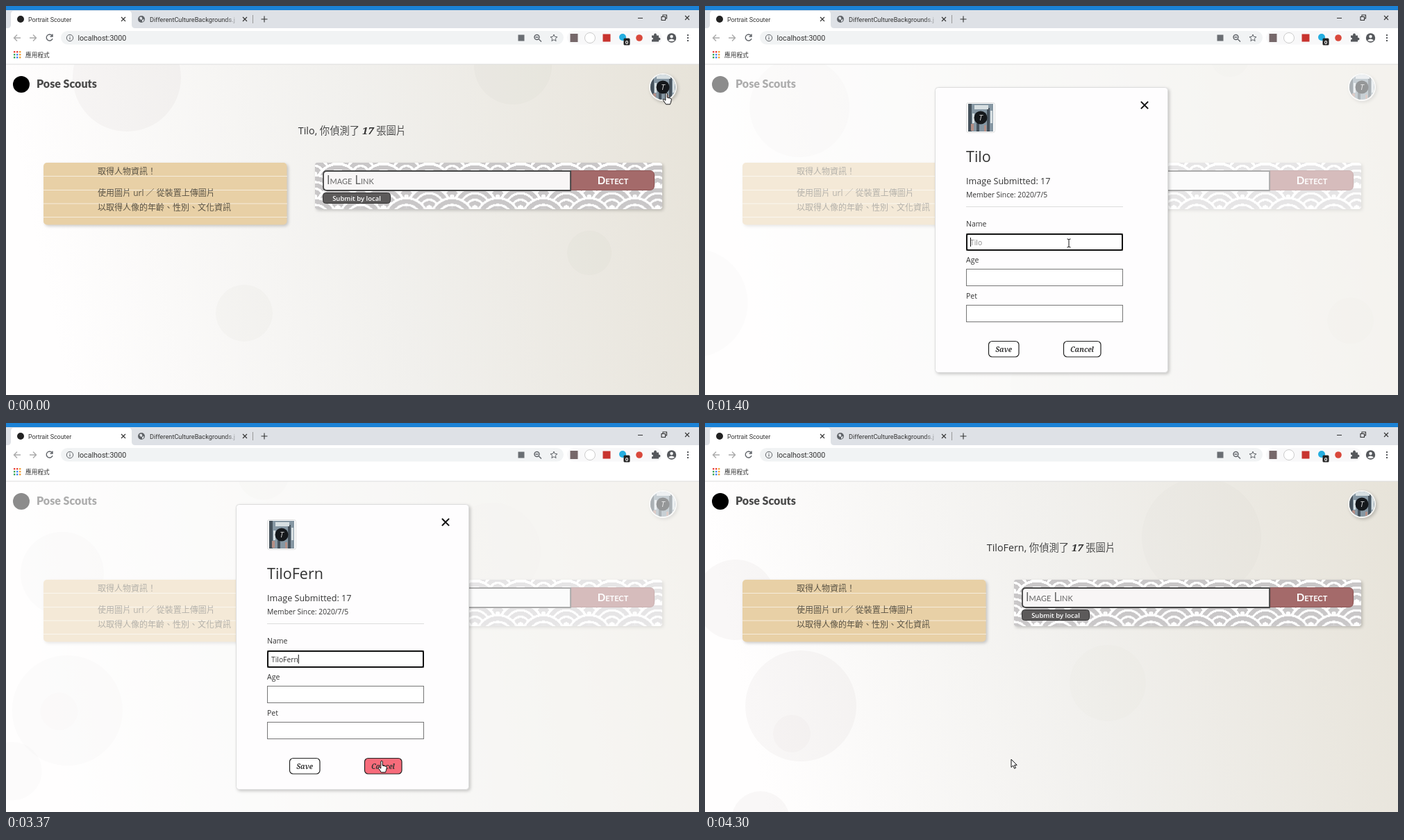
Recreate the animation shown at these times as an HTML page. Size 998 by 561 pixels, loop 4.33 s.

```html
<!DOCTYPE html>
<html lang="zh-Hant">
<head>
<meta charset="utf-8">
<title>Portrait Scouter</title>
<style>
html, body { margin: 0; width: 100%; height: 100%; overflow: hidden; background: #fff }
svg { display: block; width: 100%; height: 100% }
text { font-family: "Open Sans", "Noto Sans CJK TC", "Noto Sans CJK", sans-serif; fill: #333; white-space: pre }
.ui text { font-family: Roboto, "Noto Sans CJK TC", "Noto Sans CJK", sans-serif }
.light { font-weight: 300; font-size: 12px; fill: #5a5345 }
.caps { font-family: Lato, sans-serif; font-variant: small-caps; font-size: 15.2px }
.brush { font-family: "Noto Serif", serif; font-weight: 700; font-style: italic }
.thin { font-weight: 300; fill: #4c4c4c }
.mid { text-anchor: middle }
.line { fill: none; stroke: #5f6368; stroke-width: 1.4 }
.field { fill: #fff; stroke: #767676; stroke-width: 1 }
.button { fill: #fff; stroke: #222; stroke-width: 1.2 }
.shadow { filter: drop-shadow(2px 2px 2px #0003) }
.waves {
  --g: #c9c7c8;
  --side: var(--g) 24%, #fff 24% 28%, var(--g) 28% 36%, #fff 36% 40%, #0000 40%;
  --edge: #fff 5%, var(--g) 5% 15%, #fff 15% 20%, var(--g) 20% 29%, #fff 29% 34%, var(--g) 34% 44%, #fff 44% 49%, #0000 49%;
  height: 67px; border-radius: 4px;
  background: radial-gradient(circle at 100% 150%, var(--side)),
    radial-gradient(circle at 0 150%, var(--side)),
    radial-gradient(circle at 50% 100%, #fff 10%, var(--g) 10% 23%, #fff 23% 30%, var(--g) 30% 43%, #fff 43% 50%, var(--g) 50% 63%, #fff 63% 71%, #0000 71%),
    radial-gradient(circle at 100% 50%, var(--edge)),
    radial-gradient(circle at 0 50%, var(--edge)) var(--g);
  background-size: 65.8px 32.9px;
}
</style>
</head>
<body>
<svg viewBox="0 0 998 561">
  <defs>
    <linearGradient id="paper" y1=".1" x2="1" y2="0">
      <stop stop-color="#fffefe"/><stop offset=".5" stop-color="#f1f0ed"/><stop offset="1" stop-color="#e7e3d9"/>
    </linearGradient>
    <linearGradient id="fade"><stop stop-color="#dee1e6" stop-opacity="0"/><stop offset="1" stop-color="#dee1e6"/></linearGradient>
    <clipPath id="round"><circle r="18"/></clipPath>
    <g id="photo">
      <path fill="#8697a3" d="M-18-20h36v40h-36z"/>
      <path fill="#46525c" d="M-18-20h5v40h-5zM-6-8h4v28h-4zM9-14h4v34h-4z"/>
      <path fill="#d7dfe2" d="M-9-18h20v6h-20zM-12-6h3v14h-3zM14-10h3v18h-3z"/>
      <path fill="#b58f86" d="M-14 9h4v10h-4zM5 11h3v9h-3z"/>
      <circle r="9.5" fill="#15181b"/>
      <text class="mid" y="4" font-size="11" font-style="italic" style="fill:#ddd">T</text>
    </g>
    <path id="x" d="M-3-3 3 3M3-3-3 3"/>
  </defs>

  <rect y="84" width="998" height="477" fill="url(#paper)"/>
  <g id="bubbles" fill="#5a4c38"></g>

  <circle cx="22" cy="113" r="12"/>
  <text x="44" y="118" font-size="16" style="font-family:Lato,sans-serif;font-weight:900;fill:#4a4a4a">Pose Scouts</text>
  <g transform="translate(946 117)">
    <circle class="shadow" r="20" fill="#f4f4f2"/>
    <use href="#photo" clip-path="url(#round)"/>
  </g>
  <text class="mid" x="498.5" y="185" font-size="14.3"><tspan id="greeted"></tspan>, <tspan class="thin">你偵測了</tspan> <tspan class="brush" font-size="15">17</tspan> <tspan class="thin">張圖片</tspan></text>

  <rect class="shadow" x="54" y="226" width="350.500" height="89.500" rx="5" fill="#e8d0a6"/>
  <path stroke="#fff" stroke-opacity=".6" d="M54 245.500h351M54 265.500h351M54 285h351M54 304.500h351"/>
  <text class="light" x="132" y="243">取得人物資訊！</text>
  <text class="light" x="132" y="274">使用圖片 <tspan font-weight="400">url</tspan> ／ 從裝置上傳圖片</text>
  <text class="light" x="132" y="295">以取得人像的年齡、性別、文化資訊</text>

  <rect class="shadow" x="445" y="226" width="500" height="67" rx="4" fill="#ccc"/>
  <foreignObject x="445" y="226" width="500" height="67"><div class="waves"></div></foreignObject>
  <path fill="#a46a6a" stroke="#8d5555" d="M814 237.500h113q6.500 0 6.500 6.500v15q0 6.500-6.500 6.500H814z"/>
  <path fill="#f8f6f6" stroke="#444" stroke-width="1.800" d="M813 238H462q-5 0-5 5v18q0 5 5 5h351z"/>
  <text class="caps" x="462" y="257" style="fill:#666;font-size:16.300px">Image Link</text>
  <text class="caps mid" x="874" y="257" font-weight="700" style="fill:#fff">Detect</text>
  <rect x="456.500" y="269.500" width="97" height="15" rx="4" fill="#5c5a5a" stroke="#333"/>
  <text class="mid" x="505" y="281" font-size="9.500" font-weight="600" style="fill:#fff">Submit by local</text>

  <g id="menu">
    <rect class="shadow" x="863" y="142" width="105" height="58" fill="#f4f4f2"/>
    <rect id="pressed" x="863" y="147.500" width="104" height="24" rx="3" fill="#0a7af5" stroke="#111" stroke-width="1.600"/>
    <text id="viewItem" x="879" y="164" font-size="10">View Profile</text>
    <text x="879" y="187" font-size="10" style="fill:#666">Sign Out</text>
  </g>

  <g id="modal">
    <rect y="84" width="998" height="477" fill="#fff" fill-opacity=".55"/>
    <rect class="shadow" x="331.500" y="117.500" width="335" height="411" rx="4" fill="#fefdfe" stroke="#ddd"/>
    <rect x="376.500" y="139.500" width="41" height="43" rx="3" fill="#fff" stroke="#ddd"/>
    <use href="#photo" x="397" y="161"/>
    <use href="#x" transform="translate(633 143) scale(1.700)" stroke="#111" stroke-width="1.200"/>
    <text id="heading" x="376" y="225" font-size="21.500"></text>
    <text x="376" y="257" font-size="12.600">Image Submitted: 17</text>
    <text x="376" y="276" font-size="10.300">Member Since: 2020/7/5</text>
    <path stroke="#ddd" d="M376 289.500h226"/>
    <g font-size="10.500"><text x="376" y="318">Name</text><text x="376" y="370">Age</text><text x="376" y="422">Pet</text></g>
    <rect class="field" x="376.500" y="328.500" width="225" height="24"/>
    <rect class="field" x="376.500" y="379.500" width="225" height="24"/>
    <rect class="field" x="376.500" y="431.500" width="225" height="24"/>
    <rect id="focus" x="377" y="329" width="224" height="23" rx="2" fill="none" stroke="#111" stroke-width="2"/>
    <text id="typed" x="382" y="344.500" font-size="10.300"></text>
    <rect id="caret" y="334" width="1" height="13" fill="#111"/>
    <rect id="save" class="button" x="408.500" y="483.500" width="43.500" height="22.500" rx="5"/>
    <rect id="cancel" class="button" x="516.500" y="483.500" width="53.500" height="22.500" rx="5"/>
    <g class="mid" font-size="10"><text class="brush" x="430" y="498.500">Save</text><text class="brush" x="543" y="498.500">Cancel</text></g>
  </g>

  <g class="ui">
    <path fill="#fff" d="M0 32h998v52H0z"/>
    <path fill="#dee1e6" d="M0 6h998v26H0z"/>
    <path fill="#1b82d6" d="M0 0h998v6H0z"/>
    <path fill="#fff" d="M2 32q5 0 5-5V12q0-5 5-5h164q5 0 5 5v15q0 5 5 5z"/>
    <path stroke="#ddd" d="M0 84h998"/>
    <circle cx="21" cy="19" r="5" fill="#222"/>
    <text x="32" y="22.500" font-size="8.900">Portrait Scouter</text>
    <text x="207" y="22.500" font-size="9.200">DifferentCultureBackgrounds.j</text>
    <path fill="url(#fade)" d="M316 10h20v18h-20z"/>
    <path fill="#dee1e6" d="M336 10h4v18h-4z"/>
    <circle cx="195" cy="19" r="5" fill="#5f6368"/>
    <path fill="#dee1e6" d="M192 17q3-3 4 0t-2 3zM196 20l3-1-1 3-2 1z"/>
    <g stroke="#333" stroke-width="1.100" fill="none">
      <use href="#x" x="169" y="19"/><use href="#x" x="344" y="19"/>
      <path d="M367.500 19h9M372 14.500v9M910 17.500h7M944 15.500h5.500v5H944zM946 15v-2h5.500v5h-2"/>
      <use href="#x" x="981" y="17"/>
    </g>
    <path stroke="#999" d="M355.500 13v12"/>
    <rect x="79" y="36" width="724" height="19.500" rx="9.700" fill="#f1f3f4"/>
    <rect x="808" y="36" width="137" height="19.500" rx="9.700" fill="#f8f8f9"/>
    <path class="line" style="stroke:#aaa" d="M21 46H11.500M16 41.500 11.500 46l4.500 4.500M34 46h9.500M39 41.500l4.500 4.500-4.500 4.500"/>
    <path class="line" d="M66.500 43a4.500 4.500 0 1 0 .5 4M67 40.500v3.500h-3.500"/>
    <circle class="line" cx="92" cy="46" r="4.700" style="stroke-width:1"/>
    <path class="line" style="stroke-width:1.100" d="M92 45v3.500M92 43v1"/>
    <text x="103.500" y="49.500" font-size="10.600">localhost:3000</text>
    <path fill="#6a6e73" d="M737.500 41.500h9v9h-9z"/>
    <path class="line" d="M767.500 48l3.500 3.500M762.500 45h4"/><circle class="line" cx="764.500" cy="45" r="3.500"/>
    <path class="line" style="stroke-width:1" d="M789 41l1.400 3.300 3.600.3-2.700 2.400.8 3.500-3.100-1.900-3.100 1.900.8-3.500-2.700-2.400 3.600-.3z"/>
    <path fill="#76686a" d="M812.500 40h11v12h-11z"/>
    <circle cx="841" cy="46" r="7.500" fill="#fff" stroke="#ccc"/>
    <path fill="#c8342f" d="M859.500 40.500h11v11h-11z"/>
    <circle cx="888" cy="45" r="5" fill="#25aee0"/>
    <rect x="889.500" y="46.500" width="9" height="10" rx="1.500" fill="#222"/>
    <text class="mid" x="894" y="54.500" font-size="8" font-weight="700" style="fill:#fff">0</text>
    <circle cx="912" cy="46" r="4.800" fill="#d9483b"/>
    <path fill="#55585c" d="M930 42.500h3q0-3 2-3t2 3h3v3q2.500 0 2.500 2t-2.500 2v2h-10v-3q2 0 2-1.500t-2-1.500z"/>
    <circle cx="958.500" cy="46" r="6.700" fill="#55585c"/>
    <circle cx="958.500" cy="44" r="2.200" fill="#fff"/><path fill="#fff" d="M954 49.500q4.500-4 9 0-4.500 3-9 0z"/>
    <path fill="#55585c" d="M981 41h2v2h-2zM981 45h2v2h-2zM981 49h2v2h-2z"/>
    <g id="apps"></g>
    <text x="28" y="73.500" font-size="8.700">應用程式</text>
  </g>

  <g id="cursor" fill="#fff" stroke="#111" stroke-linejoin="round">
    <path id="arrow" d="M0 0v11.500l2.700-2.500 1.900 4.300 1.900-.9-1.900-4.100h3.600z"/>
    <path id="hand" d="M-1.200 1q1.200-2 2.400 0v6l5 1.200q1.300.5 1.100 2l-.9 4-1 2.600h-6l-4-6q-.4-2 1.400-1.300l2 1.700z"/>
    <path id="beam" fill="none" d="M-2.500-6q2 0 2.500 1 .5-1 2.500-1M0-5V5M-2.500 6q2 0 2.500-1 .5 1 2.500 1"/>
  </g>
</svg>
<script>
const LOOP = 4330, NAME = "TiloFern";
const OPEN = 800, CLOSE = 4100, FOCUS = 1330, SAVE = 4000;
const KEY_TIMES = [1770, 1830, 1880, 1930, 2300, 2600, 2670, 2770];
const $ = id => document.getElementById(id);

// Opacity, then keys of [time, x, y, radius]
const BUBBLES = [
  [.035, [0, -92, 438, 78], [4300, 138, 408, 80]],
  [.035, [0, 174, 103, 78], [730, 155, 122, 76], [3370, 81, 217, 60], [4300, 44, 255, 58]],
  [.022, [0, 343, 443, 41], [4300, 378, -28, 36]],
  [.025, [0, 730, 86, 56], [730, 743, 85, 46], [2400, 775, 60, 0]],
  [.025, [0, 840, 356, 32], [4300, 1115, 656, 36]],
  [.01, [0, 436, 628, 38], [4300, 580, 375, 55]],
  [.035, [2400, -64, 428, 42], [4300, 80, 573, 42]],
  [.015, [2600, 690, 200, 0], [3370, 700, 185, 70], [4300, 715, 165, 86]],
  [.02, [0, -100, 300, 27], [4300, 125, 448, 27]]
];
const POINTER = [
  [100, 951, 125], [450, 936, 160], [530, 933, 156], [OPEN, 933, 156], [1170, 580, 325],
  [1400, 524, 342], [3070, 524, 342], [3300, 541, 487], [3400, 541, 487],
  [3650, 436, 489], [CLOSE, 436, 489], [4300, 441, 485]
];
const SHAPES = [[0, "hand"], [150, "arrow"], [1300, "beam"], [3100, "arrow"], [3270, "hand"],
  [3460, "arrow"], [3600, "hand"], [SAVE, "arrow"]];

function at(track, t) {
  const next = track.findIndex(key => key[0] > t);
  if (next === 0) return track[0].slice(1);
  if (next < 0) return track.at(-1).slice(1);
  const a = track[next - 1], b = track[next], k = (t - a[0]) / (b[0] - a[0]);
  return a.slice(1).map((v, i) => v + (b[i + 1] - v) * k);
}

function set(el, attrs) {
  for (const name in attrs) el.setAttribute(name, attrs[name]);
}
function add(parent, tag, attrs) {
  const el = document.createElementNS("http://www.w3.org/2000/svg", tag);
  set(el, attrs);
  return parent.appendChild(el);
}
const show = (id, on) => $(id).style.display = on ? "" : "none";

const bubbles = BUBBLES.map(([opacity, ...track]) =>
  ({ track, el: add($("bubbles"), "circle", { opacity }) }));
const dotColors = ["#e8453c", "#e8453c", "#f2a33a", "#3aa757", "#4285f4", "#f2a33a", "#3aa757", "#4285f4", "#f2a33a"];
dotColors.forEach((fill, i) => add($("apps"), "rect",
  { x: 11 + i % 3 * 4, y: 65 + Math.floor(i / 3) * 4, width: 2.4, height: 2.4, fill }));

function draw(t) {
  for (const { el, track } of bubbles) {
    const [cx, cy, r] = at(track, t);
    set(el, { cx, cy, r });
  }

  const typed = NAME.slice(0, KEY_TIMES.filter(time => time <= t).length);
  const focused = t >= FOCUS && t < SAVE;
  const shortName = NAME.slice(0, 4);
  $("greeted").textContent = t < CLOSE ? shortName : NAME;
  $("heading").textContent = $("typed").textContent = typed || shortName;
  $("typed").style.fill = typed ? "#333" : "#888";

  show("menu", t >= 200 && t < OPEN);
  show("pressed", t >= 670);
  set($("viewItem"), { style: t >= 670 ? "fill:#fff;font-weight:700" : "fill:#666" });

  show("modal", t >= OPEN && t < CLOSE);
  show("focus", focused);
  show("caret", focused);
  set($("caret"), { x: 382 + (typed && focused ? $("typed").getComputedTextLength() : 0) });

  const [x, y] = at(POINTER, t);
  const over = (left, right) => y > 480 && x >= left && x <= right;
  set($("save"), { style: over(408, 452) ? `fill:#fbd283;stroke-width:${t >= SAVE ? 2.4 : 1.2}` : "" });
  set($("cancel"), { style: over(516, 571) ? "fill:#f76c7b" : "" });

  const shape = SHAPES.findLast(([start]) => start <= t)[1];
  for (const id of ["arrow", "hand", "beam"]) show(id, id === shape);
  set($("cursor"), { transform: `translate(${x} ${y})` });
}

function frame() {
  draw(performance.now() % LOOP);
  requestAnimationFrame(frame);
}
frame();
</script>
</body>
</html>
```
